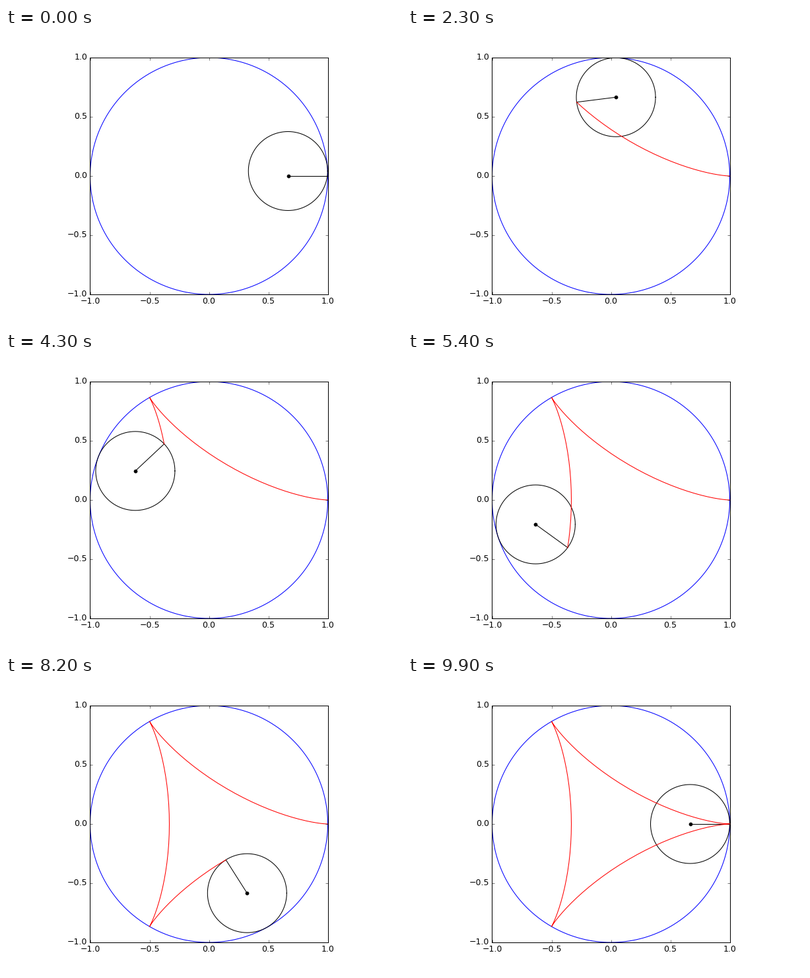
A matplotlib script for the animation above (10000 ms loop, 600 px wide and 450 px high).

```python
import numpy as np
import matplotlib.pyplot as plt
from matplotlib.animation import FuncAnimation

FRAMES = 100
R = 1 / 3

plt.rcParams.update({
    "font.family": "DejaVu Sans",
    "font.size": 12,
    "lines.linewidth": 1,
    "lines.markeredgewidth": 0.5,
    "axes.linewidth": 1,
    "axes.axisbelow": False,
    "ytick.alignment": "center",
    "savefig.dpi": "figure",
})
for axis, far in (("xtick", "top"), ("ytick", "right")):
    plt.rcParams.update({
        f"{axis}.direction": "in",
        f"{axis}.{far}": True,
        f"{axis}.labelsize": 12,
        f"{axis}.major.size": 4,
        f"{axis}.major.width": 0.5,
        f"{axis}.major.pad": 4,
    })

theta = np.linspace(0, 2 * np.pi, FRAMES + 1)


def hub(t):
    """Centre of the rolling circle."""
    return (1 - R) * np.cos(t), (1 - R) * np.sin(t)


def pen(t):
    """Traced point on the rim of the rolling circle."""
    x, y = hub(t)
    spin = (1 / R - 1) * t
    return x + R * np.cos(spin), y - R * np.sin(spin)


fig = plt.figure(figsize=(8, 6), dpi=75, facecolor="white")
ax = fig.add_axes([0.125, 0.1, 0.775, 0.8])
ax.set_aspect("equal")
ax.set(xlim=(-1, 1), ylim=(-1, 1))
ticks = np.linspace(-1, 1, 5)
ax.set_xticks(ticks)
ax.set_yticks(ticks)

ring = np.linspace(0, 2 * np.pi, 201)
ax.plot(np.cos(ring), np.sin(ring), color="#0000ff")
wheel, = ax.plot([], [], "k-")
rod, = ax.plot([], [], "k-")
dot, = ax.plot([], [], "ko", ms=5)
trail, = ax.plot([], [], color="#ff0000")


def update(i):
    x, y = hub(theta[i + 1])
    wheel.set_data(x + R * np.cos(ring), y + R * np.sin(ring))

    # The rod rests at the start while the wheel is already one step on.
    step = i + 1 if i else 0
    (x, y), (px, py) = hub(theta[step]), pen(theta[step])
    rod.set_data([x, px], [y, py])
    dot.set_data([x], [y])
    trail.set_data(*pen(theta[:step + 1]))
    return wheel, rod, dot, trail


anim = FuncAnimation(fig, update, frames=FRAMES, interval=100,
                     init_func=lambda: update(0), repeat=True, repeat_delay=0)
plt.show()
```
